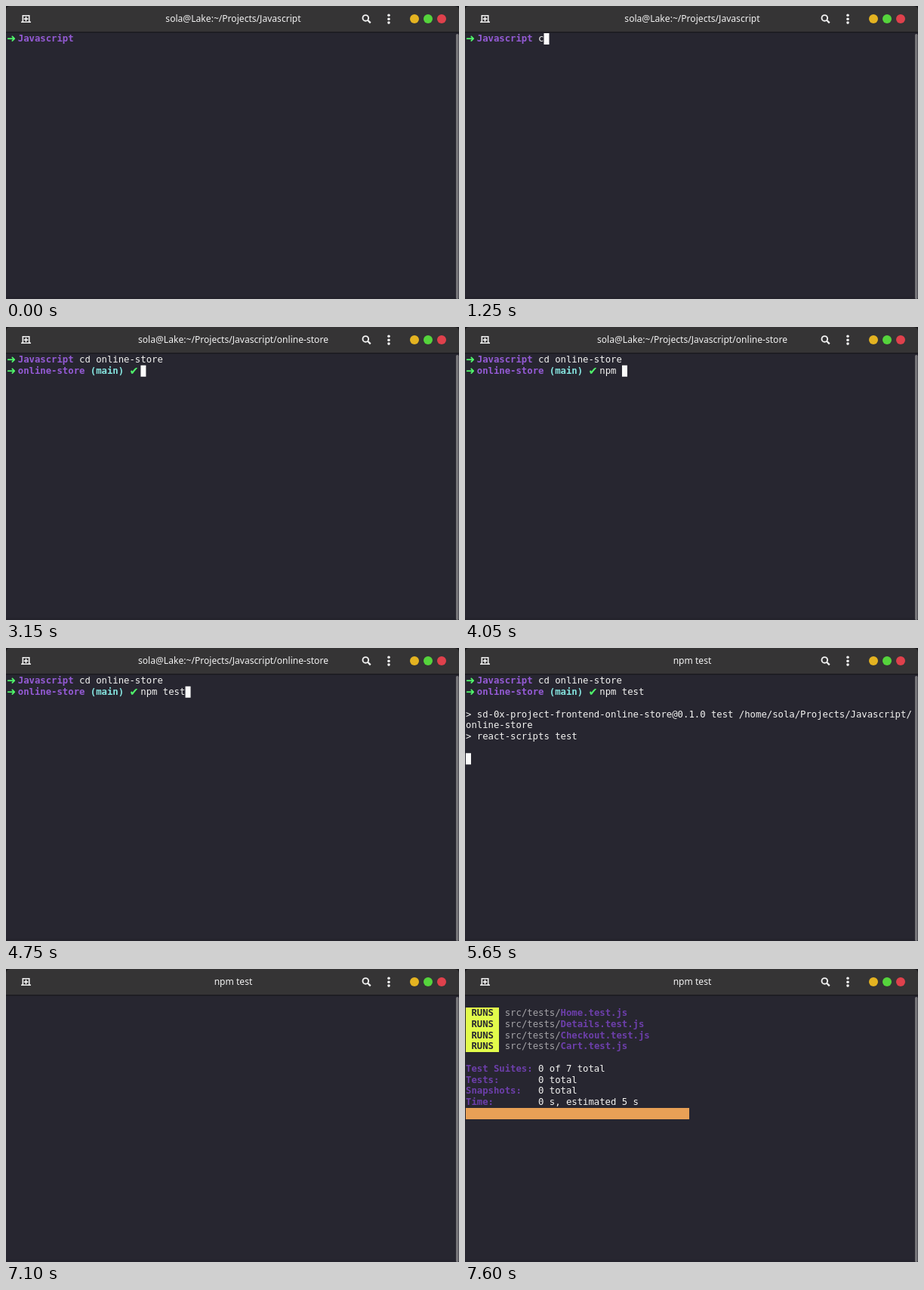
An HTML page that plays this animation: 600 by 388 pixels, repeating every 8 s.

```html
<!DOCTYPE html>
<html lang="en">
<head>
<meta charset="utf-8">
<title>Terminal</title>
<style>
  html, body { margin: 0; width: 100%; height: 100%; overflow: hidden; background: #272630; }
  #stage { position: relative; width: 600px; height: 388px; overflow: hidden; background: #272630; }
  svg { position: absolute; left: 0; top: 0; }
  #title { position: absolute; left: 1px; top: 7px; width: 600px; text-align: center; color: #f2f2f2;
    font: 12.1px/20px "Noto Sans", "Open Sans", sans-serif; }
  #screen, #cursor { position: absolute; left: 1px; }
  #screen { top: 36.4px; margin: 0; color: #f4f4f2; font: 12.28px/14.75px "DejaVu Sans Mono", monospace; }
  #screen b { font-weight: 700; }
  #cursor { top: 36px; width: 7.4px; height: 14.75px; background: #fbfbfb; }
  .cell { display: inline-block; height: 14.75px; line-height: 14.75px; vertical-align: top; white-space: pre; }
  .icon { color: #50fa6c; font-family: "DejaVu Sans", sans-serif; font-size: 14.5px; }
  .dir { color: #955bd6; }
  .slash { color: #74509f; }
  .git { color: #86e5e0; }
  .head { color: #6d3fab; }
  .dim { color: #a5a4a8; }
  .runs { width: 44.35px; background: #e2fb4b; color: #272630; font-weight: 700; }
  .bar { width: 295.7px; background: #e8a056; }
</style>
</head>
<body>
<div id="stage">
  <svg width="600" height="388">
    <rect width="600" height="34" fill="#353435"/>
    <rect y="34" width="600" height="1.5" fill="#1b1a1f"/>
    <path d="M0 0H6Q0 0 0 6ZM600 0H594Q600 0 600 6Z" fill="#17161a"/>
    <rect x="596" y="37" width="3.5" height="351" rx="1.5" fill="#77767a"/>
    <rect y="385" width="596" height="3" fill="#24232c"/>
    <g fill="none" stroke="#f2f2f2" stroke-width="1.6">
      <path d="M20 21.3H33M22.3 21V12.8H30.7V21M26.5 14.3V20M23.7 17.1H29.3"/>
      <circle cx="476.3" cy="15.9" r="3.8" stroke-width="1.9"/>
      <path d="M479.1 18.7L482.8 22.4" stroke-width="2.2"/>
    </g>
    <g fill="#f2f2f2">
      <circle cx="507" cy="12.3" r="1.8"/><circle cx="507" cy="17.2" r="1.8"/><circle cx="507" cy="22.1" r="1.8"/>
    </g>
    <circle cx="541" cy="17" r="6" fill="#e4b321"/>
    <circle cx="559" cy="17" r="6" fill="#55d43c"/>
    <circle cx="577" cy="17" r="6" fill="#df414c"/>
  </svg>
  <div id="title"></div>
  <pre id="screen"></pre>
  <div id="cursor"></div>
</div>
<script>
const LOOP = 8000, CELL_W = 7.392, CELL_H = 14.75, BLINK = 600;
const [titleEl, screenEl, cursorEl] = ["title", "screen", "cursor"].map(id => document.getElementById(id));

const bold = (cls, text) => `<b class="${cls}">${text}</b>`;
const span = (cls, text) => `<span class="${cls}">${text}</span>`;
const icon = (glyph, cells) =>
  `<span class="cell icon" style="width:${cells * CELL_W}px">${glyph}</span>`;

const home = "sola@Lake:~/Projects/Javascript";
const prompt1 = icon("➜", 2) + bold("dir", "Javascript") + " ";
const prompt2 = icon("➜", 2) + bold("dir", "online-store") + " " + bold("git", "(main)") + " " + icon("✔", 2);

// Times at which each character is typed
const cdKeys = [1200, 1350, 1550, 1800, 1900];
const npmKeys = [3650, 3700, 3900, 4000, 4200, 4350, 4450, 4650];
const typed = (text, keys, t) => text.slice(0, keys.filter(k => k <= t).length);

const npmOutput = [
  "",
  "&gt; sd-0x-project-frontend-online-store@0.1.0 test /home/sola/Projects/Javascript/",
  "online-store",
  "&gt; react-scripts test",
];

const usage = [
  ["a", "run all tests"],
  ["f", "run only failed tests"],
  ["q", "quit watch mode"],
  ["p", "filter by a filename regex pattern"],
  ["t", "filter by a test name regex pattern"],
  ["Enter", "trigger a test run"],
];
const watchScreen = [
  bold("head", "No tests found related to files changed since last commit."),
  span("dim", "Press `a` to run all tests, or run Jest with `--watchAll`."),
  "",
  bold("head", "Watch Usage"),
  ...usage.map(([key, action]) => span("dim", " › Press ") + key + span("dim", ` to ${action}.`)),
];

const summary = { "Test Suites:": "0 of 7 total", "Tests:": "0 total", "Snapshots:": "0 total",
  "Time:": "0 s, estimated 5 s" };
const runScreen = [
  "",
  ...["Home", "Details", "Checkout", "Cart"].map(name =>
    span("cell runs", " RUNS ") + span("dim", " src/tests/") + bold("head", name + ".test.js")),
  "",
  ...Object.entries(summary).map(([label, value]) => bold("head", label.padEnd(13)) + value),
  span("cell bar", ""),
];

// Returns screen lines, cursor cell (or none) and window title
function stateAt(t) {
  if (t < 2550) {
    const done = t >= 2100;
    const text = done ? "cd online-store" : typed("cd on", cdKeys, t);
    return { lines: [prompt1 + text + (done ? span("slash", "/") : "")],
      cursor: [13 + text.length + done, 0], title: home };
  }
  const lines = [prompt1 + "cd online-store"];
  if (t < 2650) return { lines, cursor: [0, 1], title: home };

  const text = typed("npm test", npmKeys, t);
  lines.push(prompt2 + text);
  if (t < 5400) return { lines, cursor: [24 + text.length, 1], title: home + "/online-store" };

  const title = "npm test";
  if (t < 5600) return { lines, cursor: [0, 2], title };
  if (t < 6250) return { lines: lines.concat(npmOutput), cursor: [0, 7], title };
  if (t < 7100) return { lines: watchScreen, cursor: [0, 10], title };
  return { lines: t < 7350 ? [] : runScreen, title };
}

// Every key press restarts the blink; the loop begins in the dark phase
const presses = [...cdKeys, 2100, 2600, ...npmKeys, 5400, 7050];
function cursorLit(t) {
  if (t < presses[0]) return t >= 450 && t < 1050;
  const last = presses.filter(p => p <= t).pop();
  return Math.floor((t - last) / BLINK) % 2 === 0;
}

function put(el, html) {
  if (el.shown !== html) el.innerHTML = el.shown = html;
}

function draw() {
  const t = performance.now() % LOOP;
  const { lines, cursor, title } = stateAt(t);
  put(titleEl, title);
  put(screenEl, lines.join("\n"));
  cursorEl.style.visibility = cursor && cursorLit(t) ? "visible" : "hidden";
  if (cursor) cursorEl.style.transform = `translate(${cursor[0] * CELL_W}px, ${cursor[1] * CELL_H}px)`;
  requestAnimationFrame(draw);
}
draw();
</script>
</body>
</html>
```
